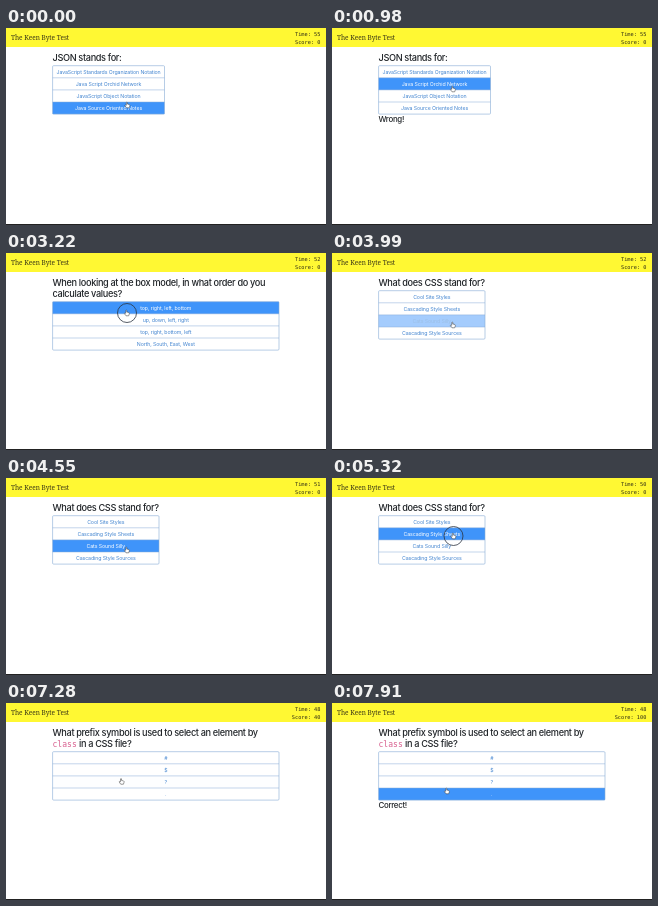
Write an HTML page that moves like this. It is 320 by 197 pixels and loops after 8000 ms.

```html
<!DOCTYPE html>
<html lang="en">
<head>
<meta charset="utf-8">
<title>Quiz</title>
<style>
html, body { margin: 0; width: 100%; height: 100%; overflow: hidden; background: #fff; }
svg { display: block; width: 100vw; height: 100vh; }
text { font-family: Inter, sans-serif; white-space: pre; }
.brand { font: 6.5px "Noto Serif", serif; fill: #3a3616; }
.stat { font: 5.26px "DejaVu Sans Mono", monospace; fill: #2c2a14; text-anchor: end; }
.ask, .note { font-weight: 500; letter-spacing: -.039em; fill: #212529; }
.ask { font-size: 9.2px; }
.note { font-size: 7.9px; }
.code { font: 8.05px "DejaVu Sans Mono", monospace; fill: #d8608f; }
.opt { font-size: 5.26px; letter-spacing: -.02em; text-anchor: middle; }
</style>
</head>
<body>
<svg viewBox="0 0 320 197" preserveAspectRatio="none"></svg>
<script>
const LOOP = 8000, LEFT = 46.6, ROW = 12.1, FADE = 150, CLICK = 140;
const svg = document.querySelector('svg');

// ask: [text, x, line, class]; start, answered: ms; points are won on a right answer
const quiz = [
  { start: 0, answered: 910, right: 158.5, ask: [['JSON stands for:', 46.5, 0]],
    opts: ['JavaScript Standards Organization Notation', 'Java Script Orchid Network',
      'JavaScript Object Notation', 'Java Source Oriented Notes'] },
  { start: 1400, answered: 2170, right: 247, ask: [['event.preventDefault() should be added to the ___', 46.5, 0]],
    opts: ['start of the inner function of the addEventListener.', 'end of the inner function of the addEventListener.',
      'top of the file.', 'the HEAD section of the HTML file where this function is used.'] },
  { start: 2660, answered: 3360, right: 273,
    ask: [['When looking at the box model, in what order do you', 46.5, 0], ['calculate values?', 46.5, 1]],
    opts: ['top, right, left, bottom', 'up, down, left, right', 'top, right, bottom, left', 'North, South, East, West'] },
  { start: 3850, answered: 5460, right: 153, points: 40, ask: [['What does CSS stand for?', 46.5, 0]],
    opts: ['Cool Site Styles', 'Cascading Style Sheets', 'Cats Sound Silly', 'Cascading Style Sources'] },
  { start: 5950, answered: 6650, right: 273,
    ask: [['What prefix symbol is used to select an element by', 46.5, 0], ['id', 253.6, 0, 'code'],
      ['in', 265, 0], ['a CSS file?', 46.5, 1]],
    opts: ['#', '.', '?', '$'] },
  { start: 7140, answered: 7840, right: 273, points: 60,
    ask: [['What prefix symbol is used to select an element by', 46.5, 0], ['class', 46.5, 1, 'code'],
      ['in a CSS file?', 73, 1]],
    opts: ['#', '$', '?', '.'] }
];
const ticks = [1120, 2100, 3080, 4130, 5110, 6090, 7140];
const hovers = [[-999, 3], [170, 2], [290, 1], [1400, -1], [1470, 2], [2660, -1], [2760, 0], [3720, 1],
  [3850, -1], [3920, 2], [5040, 1], [5950, -1], [6020, 0], [6160, 1], [7140, -1], [7280, 2], [7420, 3]];
const path = [[0, 121.5, 77], [70, 121.5, 77], [420, 121, 61], [1400, 121, 61], [1610, 120, 70], [2450, 120, 70],
  [2900, 121, 60], [3640, 121, 60], [3850, 121, 72], [4970, 121, 72], [5180, 121.5, 58], [5700, 121.5, 58],
  [6370, 116, 75], [7140, 116, 75], [7560, 115, 88], [LOOP, 115, 88]];

const text = (s, x, y, cls, extra = '') => `<text x="${x}" y="${y}" class="${cls}" ${extra}>${s}</text>`;
const rect = (x, y, w, h, fill, extra = '') =>
  `<rect x="${x}" y="${y}" width="${w}" height="${h}" fill="${fill}" ${extra}/>`;

function pointer(t) {
  const i = path.findIndex(p => p[0] > t), [t0, x0, y0] = path[i - 1], [t1, x1, y1] = path[i];
  const u = (t - t0) / (t1 - t0), k = u * u * (3 - 2 * u);
  return [x0 + (x1 - x0) * k, y0 + (y1 - y0) * k];
}

function glow(t, row) {
  const i = hovers.findLastIndex(h => h[0] <= t), k = Math.min(1, (t - hovers[i][0]) / FADE);
  if (hovers[i][1] === row) return k;
  return i && hovers[i][1] >= 0 && hovers[i - 1][1] === row ? 1 - k : 0;
}

function option(label, row, q, top, t) {
  const y = top + row * ROW, w = q.right - LEFT, k = glow(t, row);
  const mix = (a, b) => Math.round(a + (b - a) * k);
  const ink = `rgb(${mix(67, 255)},${mix(133, 255)},${mix(208, 255)})`;
  return rect(LEFT, y, w, ROW, '#3f94fa', `fill-opacity="${k}"`) +
    (row ? `<path d="M${LEFT} ${y}h${w}" stroke="#86abd6" stroke-width=".5"/>` : '') +
    text(label, LEFT + w / 2, y + ROW / 2 + 1.9, 'opt', `fill="${ink}"`);
}

function draw(t) {
  const q = quiz.findLast(q => q.start <= t);
  const lines = 1 + Math.max(...q.ask.map(a => a[2])), top = 26.7 + 11 * lines;
  const score = quiz.reduce((sum, q) => sum + (t >= q.answered ? q.points || 0 : 0), 0);
  const time = 55 - ticks.filter(s => s <= t).length;
  const [x, y] = pointer(t);

  let out = rect(0, 0, 320, 197, '#fff') + rect(0, 0, 320, 19, '#fff833') + rect(0, 196, 320, 1, '#222') +
    text('The Keen Byte Test', 5, 12.2, 'brand') +
    text('Time: ' + time, 314.3, 7.6, 'stat') + text('Score: ' + score, 314.3, 15.6, 'stat');
  for (const [s, ax, line, cls] of q.ask) out += text(s, ax, 33.2 + 11 * line, cls || 'ask');
  q.opts.forEach((label, row) => out += option(label, row, q, top, t));
  out += rect(LEFT, top, q.right - LEFT, ROW * 4, 'none', 'rx="1" stroke="#86abd6" stroke-width=".6"');
  if (t >= q.answered) out += text(q.points ? 'Correct!' : 'Wrong!', 46.5, top + 56.1, 'note');
  if (t >= q.answered - CLICK && t < q.answered)
    out += `<circle cx="${x}" cy="${y}" r="9.5" fill="none" stroke="#2b3440" stroke-width=".8"/>`;
  out += `<path transform="translate(${x} ${y})" d="M-1.2-2.6q.6-.6 1 0v1.6l2 .5q.8.4.5 1.4l-.6 1.9h-2.7l-1.6-2.3q0-.9 1.4-.2z"
    fill="#fff" stroke="#333" stroke-width=".5"/>`;
  svg.innerHTML = out;
}

const begin = performance.now();
function frame() {
  draw((performance.now() - begin) % LOOP);
  requestAnimationFrame(frame);
}
frame();
</script>
</body>
</html>
```
